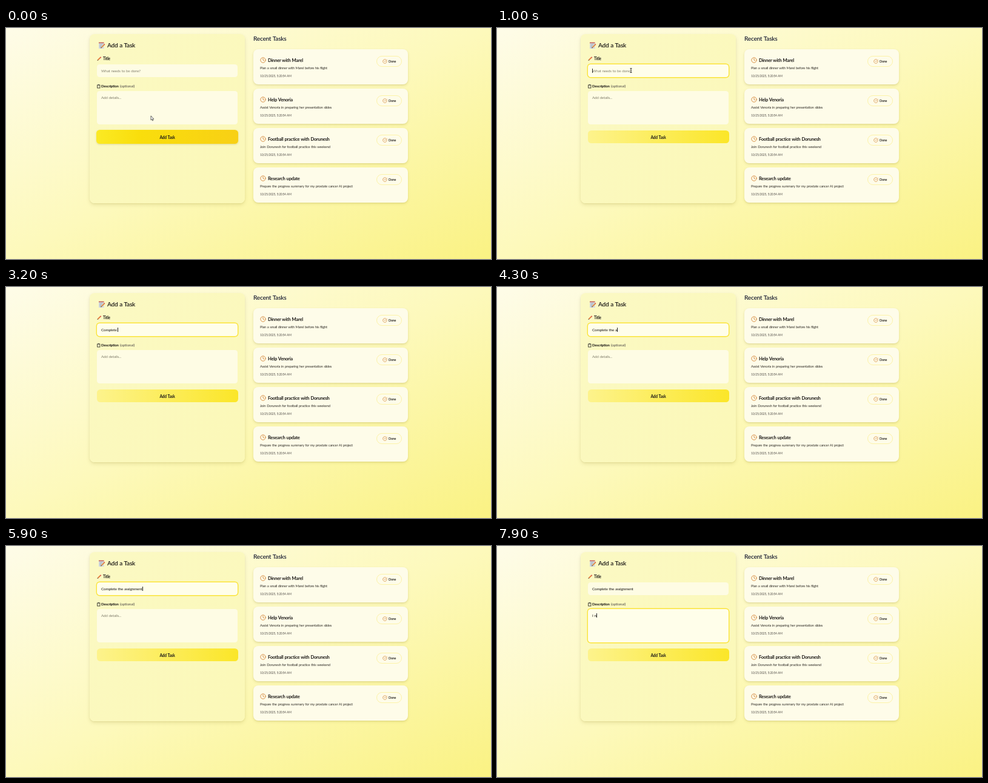
Recreate the animation shown at these times as an HTML page. Size 800 by 381 pixels, loop 8000 ms.

```html
<!DOCTYPE html>
<html lang="en">
<head>
<meta charset="utf-8">
<title>Add a Task</title>
<style>
html, body { margin: 0; width: 100%; height: 100%; overflow: hidden; }
#stage {
  position: relative; width: 800px; height: 381px; overflow: hidden;
  background: linear-gradient(to bottom right, #fefce8, #fdf9bb 50%, #faf283);
  font: 6.5px Lato, "Open Sans", sans-serif; letter-spacing: -.04em; word-spacing: .08em; color: #1c1917;
}
#stage div, #stage svg { position: absolute; box-sizing: border-box; }
/* "top" of a text line is its vertical centre */
.t { line-height: 0; white-space: pre; }
.b { font-weight: 700; }
.h { font-size: 10.1px; font-weight: 600; }
.ph { color: #85826f; font-size: 6.4px; }

#form {
  left: 138px; top: 10px; width: 255.5px; height: 278.5px; border-radius: 8px;
  background: linear-gradient(to bottom right, #fbf9c4, #fbf8b7);
  box-shadow: 0 3px 6px #7a6a0024, 0 1px 2px #7a6a0018;
}
.field { left: 150px; width: 232px; border-radius: 4.5px; background: #fefce4; animation: 8s linear infinite; }
#titleBox { top: 59.6px; height: 21.6px; animation-name: titleFocus; }
#descBox { top: 104px; height: 55px; animation-name: descFocus; }
#btn {
  left: 149.5px; top: 168.7px; width: 233px; height: 21.5px; border-radius: 5.5px;
  background: linear-gradient(90deg, #fdf38c, #fbe628);
}
#hover {
  left: 149px; top: 168.3px; width: 234px; height: 22.5px; border-radius: 5.5px;
  background: linear-gradient(90deg, #fbea24, #f9de0c 30%, #f8d015);
  box-shadow: 0 1px 3px #7a6a0038; animation: unhover 8s linear infinite;
}
#btnText { left: 149px; width: 234px; top: 180px; text-align: center; font-size: 6.6px; }

.card {
  left: 408px; width: 255px; height: 58.2px; border-radius: 8px; background: #fefce9;
  box-shadow: 0 2px 4px #7a6a0026, 0 1px 2px #7a6a0016;
}
.card .title { left: 24px; top: 18px; font-size: 7.6px; }
.card .text { left: 11px; top: 31.2px; font-size: 5.9px; color: #35322c; }
.card .date { left: 11px; top: 44px; font-size: 5px; color: #57534e; }
.card .clock { left: 11.2px; top: 12.6px; width: 10px; height: 10px; }
.pill { left: 203px; top: 10.7px; width: 41.5px; height: 18.5px; border: 1px solid #fdf3a8; border-radius: 10px; }
.pill svg { left: 9.2px; top: 4.2px; width: 8px; height: 8px; }
.pill .t { left: 19px; top: 8.5px; font-size: 5.5px; font-weight: 600; }
.line { fill: none; stroke: #cf7a28; stroke-width: 2; stroke-linecap: round; stroke-linejoin: round; }

.typed { border-right: .8px solid transparent; }
.caret { border-color: #222; }

#mouse { left: 0; top: 0; width: 16px; height: 16px; overflow: visible; animation: move 8s linear infinite; }
#arrow { animation: arrow 8s step-end infinite; }
#beam { animation: beam 8s step-end infinite; }

@keyframes titleFocus {
  0%, 9.4% { background: #fefce4; box-shadow: 0 0 0 0 #fbe43a00; }
  11.25%, 85% { background: #fffeea; box-shadow: 0 0 0 1.4px #fbe43a; }
  86.9%, 100% { background: #fefce4; box-shadow: 0 0 0 0 #fbe43a00; }
}
@keyframes descFocus {
  0%, 85% { background: #fefce4; box-shadow: 0 0 0 0 #fbe43a00; }
  86.9%, 100% { background: #fffeea; box-shadow: 0 0 0 1.4px #fbe43a; }
}
@keyframes unhover { 0%, 1.25% { opacity: 1; } 5%, 100% { opacity: 0; } }
@keyframes move {
  0% { transform: translate(239px, 145px); }
  5% { transform: translate(229px, 95px); }
  8.75%, 75% { transform: translate(221px, 70px); }
  80%, 82.5% { transform: translate(215px, 100px); }
  85%, 100% { transform: translate(208.5px, 132px); }
}
@keyframes arrow {
  0%, 4.1%, 76.9% { opacity: 1; }
  1.25%, 7.1%, 82.8%, 100% { opacity: 0; }
}
@keyframes beam {
  0%, 4.1%, 16.25%, 76.9%, 97.5%, 100% { opacity: 0; }
  1.25%, 7.1%, 75%, 82.8% { opacity: 1; }
}
</style>
</head>
<body>
<div id="stage">
  <div id="form"></div>

  <svg style="left:152px;top:22.6px" width="12" height="12" viewBox="0 0 12 12">
    <rect x="1" y="1" width="8.6" height="10" rx=".6" fill="#d3dae0"/>
    <rect x="1" y=".6" width="8.6" height="1.6" fill="#c4615b"/>
    <path d="M2.4 4h5M2.4 5.7h4M2.4 7.4h3M2.4 9.1h3" stroke="#8d9ba6" stroke-width=".6"/>
    <path d="M10.3 4.2 5.4 9.2" stroke="#e08a3c" stroke-width="1.8"/>
    <path d="M10.8 3.7 9.9 4.6" stroke="#d9534f" stroke-width="1.8"/>
    <path d="M4.8 8.6 4.2 10.4 6 9.8z" fill="#4a4038"/>
  </svg>
  <div class="t h" style="left:167px;top:28px">Add a Task</div>

  <svg style="left:150px;top:47px" width="8" height="8" viewBox="0 0 8 8">
    <path d="M5.8 1.6 1.7 5.7" stroke="#e5793a" stroke-width="1.9"/>
    <path d="M6.6.8 5.6 1.8" stroke="#d64b55" stroke-width="1.9"/>
    <path d="M1 5 .4 7.1 2.4 6.4z" fill="#6a4a35"/>
  </svg>
  <div class="t b" style="left:160px;top:51px">Title</div>
  <div id="titleBox" class="field"></div>
  <div id="titleHint" class="t ph" style="left:157px;top:71px">What needs to be done?</div>
  <div class="t" style="left:157px;top:71px"><span id="titleText" class="typed"></span></div>

  <svg style="left:150px;top:93px" width="6" height="7" viewBox="0 0 6 7">
    <rect x=".7" y="1" width="4.2" height="5" fill="none" stroke="#222" stroke-width=".8"/>
    <path d="M1.8.8h2" stroke="#222" stroke-width="1"/>
  </svg>
  <div class="t b" style="left:157px;top:96px;font-size:6.1px">Description</div>
  <div class="t" style="left:188px;top:96px;color:#57534e">(optional)</div>
  <div id="descBox" class="field"></div>
  <div id="descHint" class="t ph" style="left:157px;top:115px">Add details...</div>
  <div class="t" style="left:157px;top:115px"><span id="descText" class="typed"></span></div>

  <div id="btn"></div>
  <div id="hover"></div>
  <div id="btnText" class="t b">Add Task</div>

  <div class="t h" style="left:408px;top:17px;color:#1e2235">Recent Tasks</div>
  <div id="tasks" style="left:0;top:0"></div>

  <svg id="mouse" viewBox="0 0 16 16">
    <path id="arrow" d="M0 0V7L1.6 5.6 2.7 8 3.8 7.5 2.7 5.2H4.8z" fill="#fff" stroke="#222" stroke-width=".7"/>
    <path id="beam" d="M-1.5-3.4H1.5M0-3.4V3.4M-1.5 3.4H1.5" fill="none" stroke="#222" stroke-width=".9"/>
  </svg>
</div>
<script>
const $ = id => document.getElementById(id);

const tasks = [
  ["Dinner with Marel", "Plan a small dinner with Marel before his flight"],
  ["Help Venoria", "Assist Venoria in preparing her presentation slides"],
  ["Football practice with Dorunesh", "Join Dorunesh for football practice this weekend"],
  ["Research update", "Prepare the progress summary for my prostate cancer AI project"]
];
$("tasks").innerHTML = tasks.map(([title, text], i) => `
  <div class="card" style="top:${35 + 65 * i}px">
    <svg class="clock line" viewBox="0 0 24 24"><circle cx="12" cy="12" r="10"/><path d="M12 6v6l4 2"/></svg>
    <div class="t b title">${title}</div>
    <div class="t text">${text}</div>
    <div class="t date">10/25/2025, 5:20:54 AM</div>
    <div class="pill">
      <svg class="line" viewBox="0 0 24 24"><path d="M21.8 10A10 10 0 1 1 17 3.3M9 11l3 3L22 4"/></svg>
      <div class="t">Done</div>
    </div>
  </div>`).join("");

const LOOP = 8000, SWITCH = 6800;
const LEAD = 40; // keys land just ahead of their tick, so a late paint still shows them
const title = "Complete the assignment", desc = "I n";
// Each entry: time in ms, characters visible from then on
const titleKeys = [[1300, 1], [1400, 2], [2000, 3], [2100, 4], [2300, 5], [2400, 6], [2600, 7], [2700, 8],
  [3000, 9], [3400, 10], [3600, 12], [3700, 14], [4400, 15], [4600, 16], [4700, 18], [4800, 19],
  [5000, 20], [5100, 21], [5300, 22], [5400, 23]];
const descKeys = [[7800, 1], [7900, 3]];

function type(name, text, keys, t, focused) {
  const count = keys.reduce((n, [at, chars]) => t >= at ? chars : n, 0);
  const el = $(name + "Text");
  el.textContent = text.slice(0, count);
  el.classList.toggle("caret", focused);
  $(name + "Hint").style.visibility = count ? "hidden" : "visible";
}

// Typing shares the clock of the pointer's keyframes
const clock = $("mouse").getAnimations()[0];
function draw() {
  const t = ((clock.currentTime || 0) + LEAD) % LOOP;
  type("title", title, titleKeys, t, t >= 750 && t < SWITCH);
  type("desc", desc, descKeys, t, t >= SWITCH);
  requestAnimationFrame(draw);
}
draw();
</script>
</body>
</html>
```
